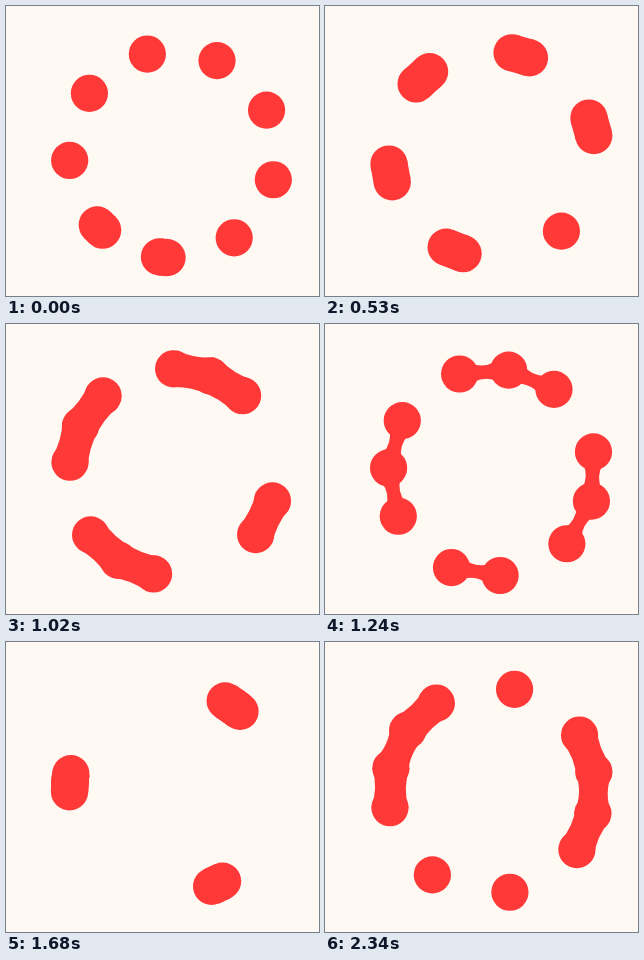
These frames come from a looping animation (313x290 px, 2.44 s). An HTML page with a canvas:

```html
<!DOCTYPE html>
<html lang="en">
<head>
<meta charset="utf-8">
<title>Gooey orbit</title>
<style>
  html, body { margin: 0; height: 100%; overflow: hidden; background: #fff9f4; }
  canvas { display: block; filter: blur(.5px); }
</style>
</head>
<body>
<canvas width="313" height="290"></canvas>
<script>
const ctx = document.querySelector('canvas').getContext('2d');
const BALLS = 11, ORBIT = 103.5, RADIUS = 18.6, REACH = 53;
const CENTER = { x: 167, y: 148.3 };
const LOOP = 2440, REST = 2340;
const rad = degrees => degrees * Math.PI / 180;

// Degrees between successive balls: speeds up, skips ahead, then grows steadily.
function spacing(time) {
  const t = Math.min(time, REST);
  return t < 900
    ? 39.5 + .0289 * t + 1.23e-5 * t * t
    : 28.5 + .0551 * t;
}

function drawBall({ x, y }) {
  ctx.beginPath();
  ctx.arc(x, y, RADIUS, 0, 2 * Math.PI);
  ctx.fill();
}

// Joins two near balls with a neck that thins as they part.
function drawBridge(a, b) {
  const dx = b.x - a.x, dy = b.y - a.y, length = Math.hypot(dx, dy);
  if (length >= REACH) return;
  const neck = RADIUS * (1 - (length / REACH) ** 6);
  const control = 2 * neck - RADIUS;
  ctx.save();
  ctx.translate(a.x, a.y);
  ctx.rotate(Math.atan2(dy, dx));
  ctx.beginPath();
  ctx.moveTo(0, -RADIUS);
  ctx.quadraticCurveTo(length / 2, -control, length, -RADIUS);
  ctx.lineTo(length, RADIUS);
  ctx.quadraticCurveTo(length / 2, control, 0, RADIUS);
  ctx.fill();
  ctx.restore();
}

function draw() {
  const step = spacing(performance.now() % LOOP);
  const balls = Array.from({ length: BALLS }, (_, i) => {
    const angle = rad(58 + (i + 1) * step);
    return { x: CENTER.x + ORBIT * Math.cos(angle), y: CENTER.y + ORBIT * Math.sin(angle) };
  });
  ctx.clearRect(0, 0, 313, 290);
  ctx.fillStyle = '#ff3838';
  balls.forEach((ball, i) => {
    drawBall(ball);
    balls.slice(0, i).forEach(other => drawBridge(ball, other));
  });
  requestAnimationFrame(draw);
}
draw();
</script>
</body>
</html>
```
